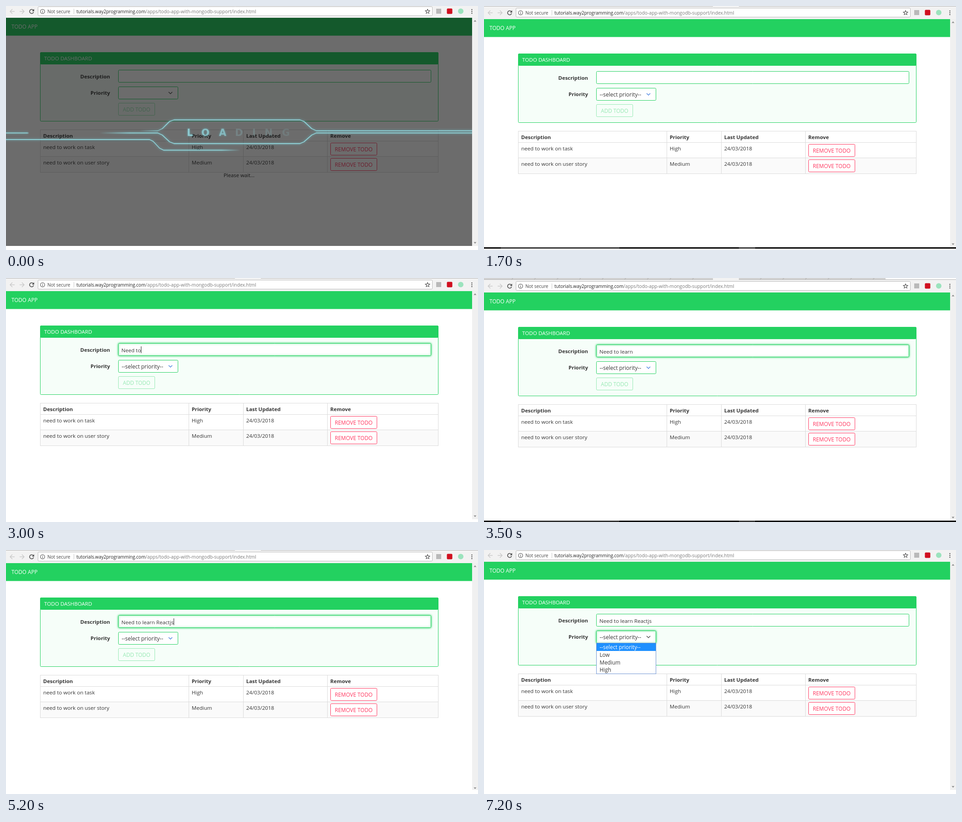
Animation of 1039x539 px, one loop 8 s. Source, as an HTML page with a canvas:

```html
<!DOCTYPE html>
<html lang="en">
<head>
<meta charset="utf-8">
<title>Todo app</title>
<style>
html, body { margin: 0; width: 100%; height: 100%; overflow: hidden; background: #fff; }
canvas { display: block; }
</style>
</head>
<body>
<canvas id="stage" width="1039" height="539"></canvas>
<script>
const ctx = document.getElementById('stage').getContext('2d');
const W = 1039, H = 539, LOOP = 8000;
const GREEN = '#23d160', RED = '#ff3860', INK = '#363636', LINE = '#dbdbdb';
const SANS = '"Open Sans", "Noto Sans", sans-serif';

// shift: vertical page offset, end: lower edge of the page
const steps = [
  { at: 0, shift: 0, end: 530, loading: true },
  { at: 500, shift: 3, end: 533, taskbar: true },
  { at: 2500, shift: 3, end: 533, typed: 'Need', focus: true, caret: true, hover: true },
  { at: 3000, shift: 3, end: 533, typed: 'Need to', focus: true, caret: true },
  { at: 3500, shift: 6, end: 536, typed: 'Need to learn', focus: true, taskbar: true },
  { at: 4000, shift: 3, end: 530, typed: 'Need to learn Reactjs', focus: true, caret: true },
  { at: 6000, shift: 0, end: 530, typed: 'Need to learn Reactjs', open: true }
];

function rect(x, y, w, h, color) {
  ctx.fillStyle = color;
  ctx.fillRect(x, y, w, h);
}

function box(x, y, w, h, fill, stroke, r = 2) {
  ctx.beginPath();
  ctx.roundRect(x + 0.5, y + 0.5, w - 1, h - 1, r);
  if (fill) { ctx.fillStyle = fill; ctx.fill(); }
  if (stroke) { ctx.strokeStyle = stroke; ctx.lineWidth = 1; ctx.stroke(); }
}

function disc(x, y, r, color) {
  ctx.fillStyle = color;
  ctx.beginPath();
  ctx.arc(x, y, r, 0, Math.PI * 2);
  ctx.fill();
}

function path(points, color, width = 1) {
  ctx.strokeStyle = color;
  ctx.lineWidth = width;
  ctx.beginPath();
  points.forEach(([x, y], i) => i ? ctx.lineTo(x, y) : ctx.moveTo(x, y));
  ctx.stroke();
}

function triangle(x, y, dir) {
  ctx.fillStyle = '#8a8a8a';
  ctx.beginPath();
  ctx.moveTo(x - 3, y - dir * 1.5);
  ctx.lineTo(x + 3, y - dir * 1.5);
  ctx.lineTo(x, y + dir * 2);
  ctx.fill();
}

function text(str, x, y, color = INK, size = 11.6, weight = 400, align = 'left') {
  ctx.font = `${weight} ${size}px ${SANS}`;
  ctx.textAlign = align;
  ctx.fillStyle = color;
  ctx.fillText(str, x, y);
}

const bold = (str, x, y, align) => text(str, x, y, INK, 11.4, 700, align);

function field(x, y, w, h, focus) {
  ctx.save();
  if (focus) { ctx.shadowColor = GREEN; ctx.shadowBlur = 4; }
  box(x, y, w, h, '#fff', GREEN);
  ctx.restore();
}

function tabs() {
  rect(0, -6, 884, 3, '#d2d2d2');
  for (let x = 63; x < 870; x += 49.7) path([[x - 2, -3], [x + 1, -6]], '#a5a5a5');
  rect(0, -3, W, 1, '#b4b4b4');
  rect(504, -6, 57, 4, '#f2f2f2');
}

function arrow(x, dir) {
  path([[x - 5 * dir, 12], [x + 5 * dir, 12]], '#c6c6c6', 1.3);
  path([[x, 7], [x + 5 * dir, 12], [x, 17]], '#c6c6c6', 1.3);
}

function star(x, y) {
  const points = [];
  for (let i = 0; i <= 10; i++) {
    const a = i * Math.PI / 5 - Math.PI / 2, r = i % 2 ? 2.3 : 5.2;
    points.push([x + r * Math.cos(a), y + r * Math.sin(a)]);
  }
  path(points, '#505050', 1.1);
}

function toolbar() {
  rect(0, -2, W, 28, '#f2f2f2');
  tabs();
  arrow(14, -1);
  arrow(35, 1);
  ctx.strokeStyle = '#505050';
  ctx.lineWidth = 1.6;
  ctx.beginPath();
  ctx.arc(56.5, 12, 4.5, 0.3, Math.PI * 1.75);
  ctx.stroke();
  ctx.fillStyle = '#505050';
  ctx.beginPath();
  ctx.moveTo(62, 6.5);
  ctx.lineTo(62, 11.5);
  ctx.lineTo(57, 11.5);
  ctx.fill();

  box(70, 1, 869, 21, '#fff', '#b8b8b8');
  ctx.strokeStyle = '#555';
  ctx.lineWidth = 1.1;
  ctx.beginPath();
  ctx.arc(80.5, 12, 4.7, 0, Math.PI * 2);
  ctx.stroke();
  rect(80, 11, 1, 4, '#555');
  rect(80, 9, 1, 1, '#555');
  text('Not secure', 91, 15.5, '#444', 10);
  rect(149, 6, 1, 12, '#c8c8c8');
  text('tutorials.way2programming.com', 155, 15.5, '#222', 10);
  text('/apps/todo-app-with-mongodb-support/index.html', 307, 15.5, '#7b7b7b', 10.25);
  star(928, 12);
  rect(947, 6, 11, 11, '#b9b9b9');
  box(970, 5, 13, 13, '#d01020', null, 2);
  disc(1001, 11.5, 6, '#9be3bd');
  for (let i = 0; i < 3; i++) disc(1025.5, 8 + i * 4, 1.2, '#505050');
}

function form(s) {
  box(75, 102, 877, 153, '#f6fef9', GREEN);
  box(75, 102, 877, 27, GREEN, GREEN);
  text('TODO DASHBOARD', 84, 120, '#fff');

  bold('Description', 229, 160, 'right');
  field(247, 141, 689, 28, s.focus);
  if (s.typed) {
    text(s.typed, 254, 160.5);
    if (s.caret) rect(Math.round(254.5 + ctx.measureText(s.typed).width), 148, 1, 15, '#222');
  }

  bold('Priority', 229, 196, 'right');
  field(247, 178, 132, 28, s.open);
  if (!s.loading) text('--select priority--', 254.5, 196.5, INK, 12);
  const chevron = s.open || s.loading ? '#363636' : '#3273dc';
  path([[358, 190], [362, 194], [366, 190]], chevron, 1.1);

  ctx.globalAlpha = 0.45;
  box(247, 214, 81, 28, null, GREEN);
  text('ADD TODO', 287.5, 232.5, GREEN, 11.7, 400, 'center');
  ctx.globalAlpha = 1;
}

function table(s) {
  const rows = [['need to work on task', 'High'], ['need to work on user story', 'Medium']];
  const cols = [75, 402, 522, 707, 951], lines = [273, 298, 332, 367];
  if (s.hover) rect(75, 299, 876, 34, '#f3f3f3');
  rect(75, 333, 876, 34, '#fafafa');
  cols.forEach(x => rect(x, 273, 1, 95, LINE));
  lines.forEach(y => rect(75, y, 877, 1, LINE));
  ['Description', 'Priority', 'Last Updated', 'Remove']
    .forEach((head, i) => bold(head, cols[i] + 6.7, 290.5));
  rows.forEach(([task, priority], i) => {
    const y = 316 + i * 34.3;
    text(task, 82, y);
    text(priority, 408.7, y);
    text('24/03/2018', 528.7, y);
    box(714, 302 + i * 34, 103, 28, s.hover && !i ? '#f3f3f3' : '#fff', RED);
    text('REMOVE TODO', 765.3, 320.5 + i * 34, RED, 11.75, 400, 'center');
  });
}

function dropdown() {
  rect(247, 205, 132, 69, '#6f94d2');
  rect(248, 206, 130, 67, '#fff');
  rect(248, 206, 130, 17, '#1e90ff');
  ['--select priority--', 'Low', 'Medium', 'High']
    .forEach((item, i) => text(item, 254.5, 219 + i * 16.8, i ? INK : '#fff', 11.8));
}

function glow(points, fade) {
  const first = points[0][0], last = points[points.length - 1][0];
  const tint = ctx.createLinearGradient(first, 0, last, 0);
  const clear = 'rgba(150,222,228,0)', full = 'rgba(150,222,228,.85)';
  tint.addColorStop(0, fade.includes('l') ? clear : full);
  tint.addColorStop(0.08, full);
  tint.addColorStop(0.92, full);
  tint.addColorStop(1, fade.includes('r') ? clear : full);
  path(points, tint, 1.8);
}

function loading() {
  rect(0, 26, 1026, 504, 'rgba(10,10,10,.6)');
  ctx.save();
  ctx.beginPath();
  ctx.rect(0, 26, 1026, 504);
  ctx.clip();
  ctx.lineJoin = 'round';
  ctx.shadowColor = 'rgba(110,215,225,.8)';
  ctx.shadowBlur = 5;
  glow([[0, 280.5], [51, 280.5]], 'r');
  glow([[294, 275.5], [334, 275.5], [344, 271], [360, 255], [370, 251.5], [647, 251.5],
    [656, 255], [673, 271], [683, 275.5], [1030, 275.5]], 'l');
  glow([[206, 280.5], [334, 280.5], [344, 285], [360, 300], [370, 304], [647, 304],
    [656, 300], [673, 285], [683, 280.5], [1030, 280.5]], 'l');
  glow([[-4, 295], [316, 295], [324, 299], [338, 314], [347, 318.5], [516, 318.5]], 'r');

  ctx.font = 'bold 21px "DejaVu Sans", sans-serif';
  ctx.textAlign = 'center';
  [405, 439, 477, 513, 546, 578, 616].forEach((x, i) => {
    const alpha = i < 3 ? 0.8 - i * 0.1 : 0.3 - i * 0.025;
    ctx.shadowBlur = i < 3 ? 4 : 0;
    ctx.fillStyle = `rgba(150,215,222,${alpha})`;
    ctx.fillText('LOADING'[i], x, 286.5);
  });
  ctx.restore();
  text('Please wait...', 513, 378, '#161616', 11.3, 400, 'center');
}

function taskbar(y) {
  rect(0, y, W, 3, '#000');
  rect(37, y, 261, 3, '#333');
  rect(561, y, 36, 3, '#383838');
}

function draw(s) {
  rect(0, 0, W, H, '#fff');
  ctx.save();
  ctx.beginPath();
  ctx.rect(0, 0, W, s.end);
  ctx.clip();
  ctx.translate(0, s.shift);
  toolbar();
  rect(0, 26, 1026, 510, '#fff');
  rect(0, 26, 1026, 39.5, GREEN);
  text('TODO APP', 12, 50, '#fff', 11.7);
  form(s);
  table(s);
  if (s.open) dropdown();
  if (s.loading) loading();
  rect(1026, 26, 13, 504, '#f0f0f0');
  triangle(1032.5, 33, -1);
  triangle(1032.5, 523, 1);
  ctx.restore();
  if (s.taskbar) taskbar(s.end);
}

let start = null;
function frame(now) {
  if (start === null) start = now;
  const t = (now - start) % LOOP;
  draw(steps.findLast(s => s.at <= t));
  requestAnimationFrame(frame);
}
requestAnimationFrame(frame);
</script>
</body>
</html>
```
